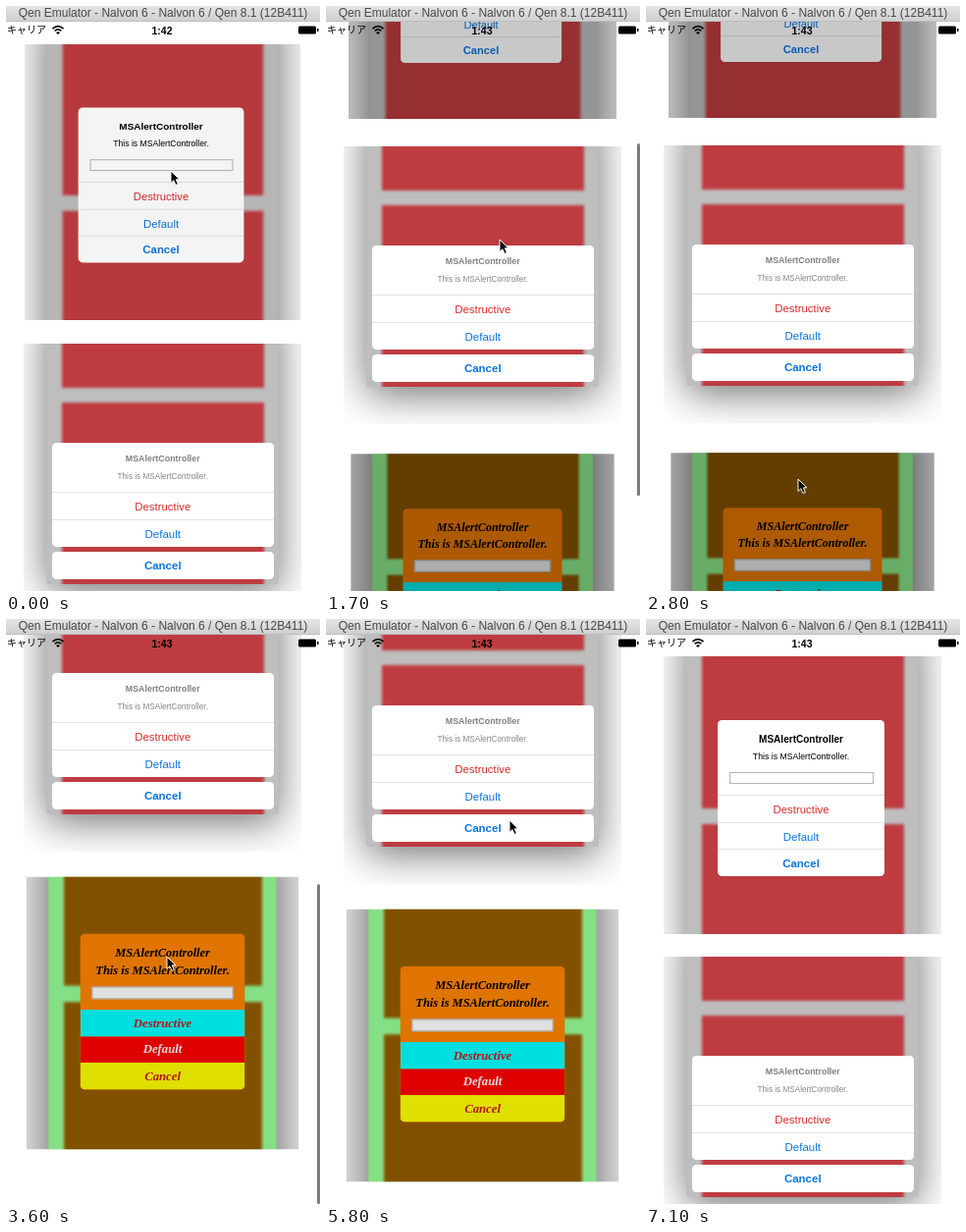
An HTML page that plays this animation: 320x596 px, repeating every 7200 ms.

```html
<!DOCTYPE html>
<html lang="ja">
<head>
<meta charset="utf-8">
<title>Alert styles</title>
<style>
html, body { margin: 0; width: 100%; height: 100%; overflow: hidden; background: #fff; }
#stage { position: relative; width: 320px; height: 596px; overflow: hidden; background: #fff;
  font-family: "Liberation Sans", Arial, sans-serif; }
#stage div, #stage p, #stage svg { position: absolute; box-sizing: border-box; margin: 0; }
#stage p { left: 0; width: 100%; line-height: 16px; text-align: center; white-space: nowrap; }
#page, #tint { left: 0; top: 0; width: 320px; height: 596px; overflow: hidden; }
.cell { left: 18px; width: 283px; height: 283px; overflow: hidden; background: #fff; }
.phone { left: 23px; width: 237px; border-radius: 3px; box-shadow: 0 8px 40px rgba(0,0,0,.56); }
.view { inset: 0; overflow: hidden; border-radius: 3px; }
.row { left: 16px; width: 206px; filter: blur(1.4px); }
.box { overflow: hidden; border-radius: 4.5px; background: #fff; }
.line { left: 0; width: 100%; height: 1px; background: #e2e2e4; }
.field { background: #fff; border: 1px solid #b4b4b4; }
.serif { font: italic bold 12.7px "Liberation Serif", "Times New Roman", serif; }
#bar { left: 0; top: 0; width: 320px; height: 16px; background: linear-gradient(#e4e4e4, #d0d0d0);
  border-bottom: 1px solid #bdbdbd; color: #484848; }
#scroll { left: 317px; width: 2.5px; border-radius: 2px; background: #7c7c7c; }
#carrier { font: 10px "Noto Sans CJK JP", "Noto Sans CJK", sans-serif; }
</style>
</head>
<body>
<div id="stage"></div>
<script>
const RED = '#da2a2a', BLUE = '#0a74e0';
const stage = document.getElementById('stage');

const div = (cls, x, y, w, h, inner = '', css = '') =>
  `<div class="${cls}" style="left:${x}px;top:${y}px;width:${w}px;height:${h}px;${css}">${inner}</div>`;
const text = (y, s, size, color, weight = 'normal') =>
  `<p style="top:${y - 8}px;font-size:${size}px;color:${color};font-weight:${weight}">${s}</p>`;
const line = y => `<div class="line" style="top:${y}px"></div>`;

const TITLE = 'MSAlertController', MESSAGE = 'This is MSAlertController.';

const plainAlert = (x, y) => div('box', x, y, 170, 159,
  text(20, TITLE, 10.05, '#000', 'bold') + text(36.5, MESSAGE, 8.73, '#000') +
  div('field', 11.5, 52.5, 147.5, 12.5) +
  line(76) + line(104) + line(131) +
  text(90.5, 'Destructive', 11.4, RED) + text(118.5, 'Default', 11.5, BLUE) +
  text(146, 'Cancel', 11.5, BLUE, 'bold'));

const sheet = (x, y) => div('', x, y, 226.5, 139,
  div('box', 0, 0, 226.5, 106,
    text(16, TITLE, 8.9, '#808080', 'bold') + text(35, MESSAGE, 8.2, '#868686') +
    line(50) + line(78) +
    text(65, 'Destructive', 11.4, RED) + text(93, 'Default', 11.5, BLUE)) +
  div('box', 0, 111, 226.5, 28, text(14, 'Cancel', 11.5, BLUE, 'bold')));

const band = (y, bg, label, color) =>
  div('', 0, y, 170.5, 27.6, text(13.8, label, 13, color, 'bold'), `background:${bg}`);
const customAlert = (x, y) => div('box serif', x, y, 170.5, 162,
  text(20.5, TITLE, 12.7, '#000', 'bold') + text(38.5, MESSAGE, 12.7, '#000', 'bold') +
  div('field', 11.5, 55.5, 147.5, 12.5) +
  band(79.5, '#00ffff', 'Destructive', '#d01818') +
  band(107, '#ff0000', 'Default', '#fff') +
  band(134.5, '#ffff00', 'Cancel', '#d01818'), 'background:#ff8400');

// A cropped phone screenshot with two blurred rows behind an alert
const cell = (id, bottom, bg, fill, end, start, inner) =>
  `<div class="cell" id="${id}"><div class="phone" style="top:-40px;height:${bottom + 40}px;background:${bg}">
   <div class="view">${[[0, end + 40], [start + 40, 320]].map(([y, h]) =>
     `<div class="row" style="top:${y}px;height:${h}px;background:${fill}"></div>`).join('')}</div></div>${inner}</div>`;

stage.innerHTML = `
<div id="page">
  ${cell('c0', 330, '#bebebe', '#be3c40', 155, 171, plainAlert(55, 65))}
  ${cell('c1', 245, '#bebebe', '#be3c40', 45, 60, sheet(28.5, 101))}
  ${cell('c2', 330, '#98ff98', '#945c00', 112.5, 130, customAlert(56.3, 58.5))}
  <div id="scroll"></div>
</div>
<div id="tint"></div>
<div id="m0">${plainAlert(75, 227.5)}</div>
<div id="m1">${sheet(46.75, 451)}</div>
<div id="m2">${customAlert(74.75, 226)}</div>
<p id="carrier" style="left:1px;top:16px;width:44px;text-align:left">キャリア</p>
<svg style="left:46px;top:19px" width="14" height="11" fill="none" stroke="#000" stroke-width="1.7">
  <path d="M1.5 4.2Q7 -.8 12.5 4.2M3.7 6.4Q7 3.4 10.3 6.4"/><path d="M7 10L5 7.9Q7 6.6 9 7.9Z" fill="#000" stroke="none"/></svg>
<p id="clock" style="left:-1px;top:17px;font-size:10.5px;font-weight:bold"></p>
<svg style="left:297px;top:20px" width="23" height="10">
  <rect x="1" y=".5" width="18" height="8" rx="1.5"/><path d="M20 3h1.5v3H20z"/></svg>
<div id="bar">${text(7, 'Qen Emulator - Nalvon 6 - Nalvon 6 / Qen 8.1 (12B411)', 12, '#484848')}</div>
<svg id="cursor" style="left:0;top:0" width="14" height="20">
  <path d="M1 1V13.4L3.9 10.7L6 15.4L8.4 14.4L6.3 9.8H10Z" stroke="#fff" stroke-width="1"/></svg>`;

const el = id => document.getElementById(id);
const [page, tint, scroller, clock, cursor] = ['page', 'tint', 'scroll', 'clock', 'cursor'].map(el);
const cells = ['c0', 'c1', 'c2'].map(el), modals = ['m0', 'm1', 'm2'].map(el);

const LOOP = 7200, STEP = 100, VIEW = 580, MAX = 357;
const scrollKeys = [[1250, 0], [1700, 201], [2800, 202], [2900, 202], [3600, 390], [3950, MAX], [5800, MAX], [6500, 0]];
const cursorKeys = [[0, 168, 168], [400, 168, 170], [800, 164, 365], [1000, 164, 365], [1250, 174, 430],
  [1700, 177, 238], [2000, 177, 238], [2300, 165, 562], [2450, 165, 562], [2800, 155, 482],
  [3200, 162, 360], [3600, 164, 344], [4400, 165, 350], [4800, 167, 357], [5150, 167, 357],
  [5800, 187, 205], [6250, 190, 440], [6700, 190, 620], [7199, 190, 620]];
const modalKeys = [[200, 450, 1000, 1200], [1950, 2200, 2450, 2650], [4100, 4350, 5200, 5450]]
  .map(([a, b, c, d]) => [[a, 0], [b, 1], [c, 1], [d, 0]]);
const pressKeys = [[[0, .993], [100, .96], [250, .96], [450, 1], [7100, 1], [7200, .993]],
  [[1800, 1], [1900, .965], [2000, .965], [2200, 1]],
  [[3950, 1], [4050, .975], [4150, .975], [4300, 1]]];
const tints = ['0,0,0,.25', '0,0,0,.25', '0,255,0,.4'];

const clamp = x => Math.max(0, Math.min(1, x));

// Smooth interpolation through [time, ...values] keys
function track(keys, t) {
  const i = keys.findIndex(k => k[0] > t);
  if (i === 0) return keys[0].slice(1);
  if (i < 0) return keys[keys.length - 1].slice(1);
  const a = keys[i - 1], b = keys[i], u = (t - a[0]) / (b[0] - a[0]), e = u * u * (3 - 2 * u);
  return a.slice(1).map((v, n) => v + (b[n + 1] - v) * e);
}

function draw(t) {
  const [y] = track(scrollKeys, t);
  const depth = [1 - .035 * clamp(y / 201), 1, .948 + .032 * clamp((y - 201) / 156)];
  cells.forEach((c, i) => {
    const s = depth[i] * track(pressKeys[i], t)[0];
    c.style.top = 38 + 306 * i - y + 'px';
    c.style.transform = `scale(${s})`;
    c.style.filter = s < 1 ? `brightness(${1 - 6.2 * (1 - s)})` : 'none';
  });

  const over = Math.max(0, y - MAX), ratio = VIEW / (VIEW + MAX);
  scroller.style.top = 16 + Math.min(y, MAX) * ratio + over + 'px';
  scroller.style.height = VIEW * ratio - over + 'px';
  scroller.style.opacity = (t > 1250 && t < 2000) || (t > 2900 && t < 4100) || (t > 5800 && t < 6900) ? 1 : 0;

  const shown = modalKeys.map(k => track(k, t)[0]);
  const top = shown.indexOf(Math.max(...shown)), k = shown[top];
  page.style.filter = k ? `blur(${1.8 * k}px)` : 'none';
  tint.style.background = `rgba(${tints[top]})`;
  tint.style.opacity = k;
  modals.forEach((m, i) => {
    const v = shown[i], box = m.firstElementChild;
    m.style.visibility = v ? 'visible' : 'hidden';
    if (i === 1) {
      box.style.transformOrigin = '50% 100%';
      box.style.transform = `translateY(${(1 - v) * 200}px) scale(1.356)`;
    } else {
      box.style.opacity = v;
      box.style.transform = `scale(${1.386 * (1 + .15 * (1 - v))})`;
    }
  });

  clock.textContent = t < 1200 ? '1:42' : '1:43';
  const [cx, cy] = track(cursorKeys, t);
  cursor.style.transform = `translate(${cx - 1}px,${cy - 1}px)`;
}

const begin = performance.now();
function tick() {
  const t = (performance.now() - begin) % LOOP;
  draw(Math.floor(t / STEP) * STEP);
  requestAnimationFrame(tick);
}
tick();
</script>
</body>
</html>
```
